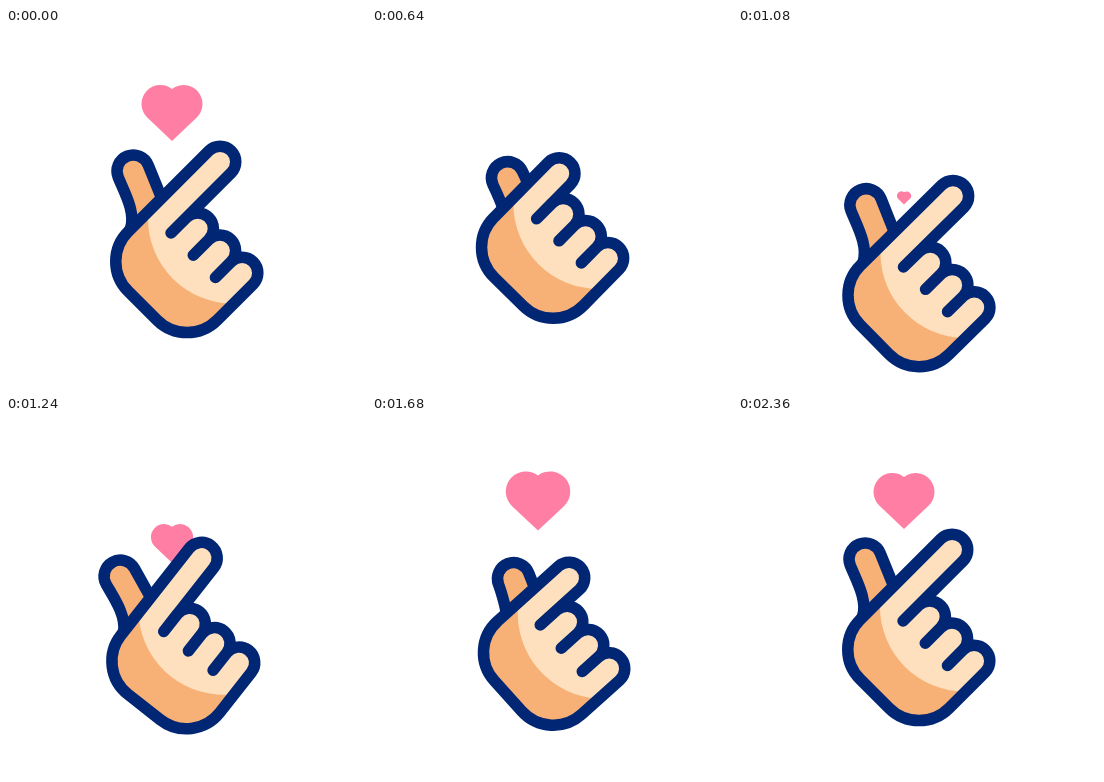
An HTML page with a canvas for the animation above (2400 ms loop, 360 by 360 pixels).

```html
<!DOCTYPE html>
<html lang="en">
<head>
<meta charset="utf-8">
<title>Finger heart</title>
<style>
  html, body { margin: 0; width: 100%; height: 100%; overflow: hidden; background: #fff; }
  canvas { display: block; width: 360px; height: 360px; }
</style>
</head>
<body>
<canvas id="stage"></canvas>
<script>
const SIZE = 360, LOOP = 2400, STEP = 20;
const NAVY = '#002674', LIGHT = '#fee0be', SHADE = '#f7b076', PINK = '#ff7fa4';

const canvas = document.getElementById('stage');
const ctx = canvas.getContext('2d');
const ratio = window.devicePixelRatio || 1;
canvas.width = canvas.height = SIZE * ratio;

// Tracks are [time, value] pairs joined by sine easing.
const tilt = [[0, 0], [340, -15.4], [945, 15], [1175, -8], [1520, 6], [1840, 0]];
const drop = [[0, 0], [310, 36], [740, -21.5], [1090, 34], [1400, -14], [1820, 9], [2320, 0]];
const spread = [[0, 1], [700, 0], [1070, 1], [1880, 0], [2360, 1]];
const heartSize = [[0, 1], [840, 0], [900, 0], [1520, 1.2], [1770, 1]];
const heartY = [[0, 85], [840, 192], [900, 192], [1500, 85]];

function at(track, t) {
  for (let i = 1; i < track.length; i++) {
    const [t0, a] = track[i - 1], [t1, b] = track[i];
    if (t <= t1) return a + (b - a) * (1 - Math.cos(Math.PI * (t - t0) / (t1 - t0))) / 2;
  }
  return track[track.length - 1][1];
}

function drawHeart(y, scale) {
  if (scale < 0.01) return;
  const x = 11.5, r = 19, notch = Math.acos(x / r);
  ctx.save();
  ctx.translate(166, y);
  ctx.scale(scale, scale);
  ctx.fillStyle = PINK;
  ctx.beginPath();
  ctx.moveTo(0, 28);
  ctx.arc(-x, -9, r, Math.PI * 0.74, -notch);
  ctx.arc(x, -9, r, Math.PI + notch, Math.PI * 0.26);
  ctx.closePath();
  ctx.fill();
  ctx.restore();
}

// Hand space: fingers point up, the little fingertip is centred on the origin.
function drawThumb(open) {
  const x = -127.5 - 21.5 * open, y = 14.5 - 9.5 * Math.sqrt(open);
  const angle = 0.35 + 0.05 * open, dx = Math.cos(angle), dy = Math.sin(angle), r = 16.2;
  const lowX = x - dy * r, lowY = y + dx * r;
  const baseX = -110, baseY = 38 + 10 * open;
  ctx.beginPath();
  ctx.moveTo(baseX, baseY);
  ctx.bezierCurveTo(baseX - 8, baseY - 4 - 12 * open,
    lowX + dx * 16 * open, lowY + dy * 16 * open, lowX, lowY);
  ctx.arc(x, y, r, angle + Math.PI / 2, angle - Math.PI / 2);
  ctx.lineTo(-100, y - dx * r + (-100 - x - dy * r) * Math.tan(angle));
  ctx.lineTo(-100, 30);
  ctx.closePath();
  ctx.fillStyle = SHADE;
  ctx.fill();
  ctx.stroke();
}

function palmPath(reach) {
  const r = 15.7, gap = 2 * r, path = new Path2D();
  path.moveTo(-109.8, 51);
  for (let i = 3; i >= 0; i--) {
    path.arc(-i * gap, i === 3 ? -reach : 0, r, Math.PI, 0);
    if (i) path.lineTo(r - i * gap, 22);
  }
  path.arc(-26.8, 51, 42.5, 0, Math.PI / 2);
  path.arc(-67.8, 51.5, 42, Math.PI / 2, Math.PI);
  path.closePath();
  return path;
}

function drawHand(t) {
  const open = at(spread, t);
  ctx.save();
  ctx.translate(154.8, 266.2 + at(drop, t));
  ctx.rotate((45 + at(tilt, t)) * Math.PI / 180);
  ctx.translate(42.5, -72.5);
  ctx.lineWidth = 11.5;
  ctx.lineJoin = ctx.lineCap = 'round';
  ctx.strokeStyle = NAVY;

  drawThumb(open);
  const palm = palmPath(25.5 + 37.5 * open);
  ctx.save();
  ctx.clip(palm);
  ctx.fillStyle = SHADE;
  ctx.fillRect(-120, -100, 150, 210);
  ctx.fillStyle = LIGHT;
  ctx.beginPath();
  ctx.arc(-45, -32, 85, 0, Math.PI * 2);
  ctx.fill();
  ctx.restore();
  ctx.stroke(palm);
  ctx.restore();
}

function draw(now) {
  const t = Math.min(LOOP - 2 * STEP, Math.floor(now % LOOP / STEP) * STEP);
  ctx.setTransform(ratio, 0, 0, ratio, 0, 0);
  ctx.fillStyle = '#fff';
  ctx.fillRect(0, 0, SIZE, SIZE);
  drawHeart(at(heartY, t), at(heartSize, t));
  drawHand(t);
}

let start;
function tick(now) {
  if (start === undefined) start = now;
  draw(now - start);
  requestAnimationFrame(tick);
}
draw(0);
requestAnimationFrame(tick);
</script>
</body>
</html>
```
